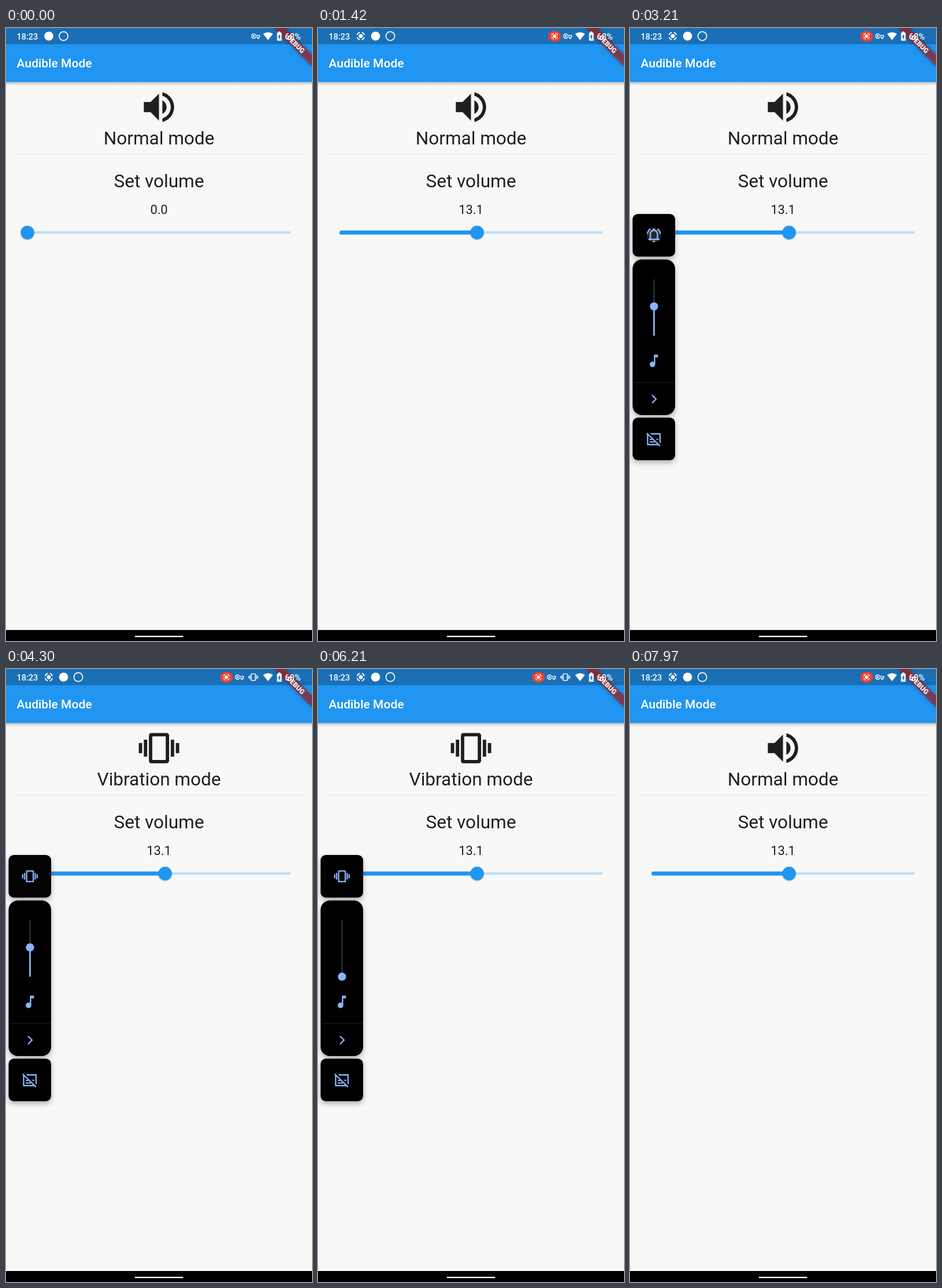
An HTML page with a canvas that plays this animation: 529x1058 px, repeating every 8 s.

```html
<!DOCTYPE html>
<html lang="en">
<head>
<meta charset="utf-8">
<title>Audible Mode</title>
<style>
html, body { margin: 0; width: 100%; height: 100%; overflow: hidden; background: #f8f8f7; }
canvas { display: block; width: 529px; height: 1058px; }
</style>
</head>
<body>
<canvas id="stage"></canvas>
<script>
const W = 529, H = 1058, LOOP = 8000;
const BLUE = '#2095f1', BG = '#f8f8f7', INK = '#1f1f1d', LIGHT = '#8ab4f8';
const FONT = 'Roboto, sans-serif';

const canvas = document.getElementById('stage');
const dpr = window.devicePixelRatio || 1;
canvas.width = W * dpr;
canvas.height = H * dpr;
const c = canvas.getContext('2d');

// Icon outlines on a 24 unit grid
const icons = {
  volume: 'M3 9v6h4l5 5V4L7 9H3zm13.5 3c0-1.77-1.02-3.29-2.5-4.03v8.05c1.48-.73 2.5-2.25 2.5-4.02zM14 3.23v2.06c2.89.86 5 3.54 5 6.71s-2.11 5.85-5 6.71v2.06c4.01-.91 7-4.49 7-8.77s-2.99-7.86-7-8.77z',
  vibrate: 'M0 15h2V9H0v6zm3 2h2V7H3v10zm19-8v6h2V9h-2zm-3 8h2V7h-2v10zM16.5 3h-9C6.67 3 6 3.67 6 4.5v15c0 .83.67 1.5 1.5 1.5h9c.83 0 1.5-.67 1.5-1.5v-15c0-.83-.67-1.5-1.5-1.5zM16 19H8V5h8v14z',
  bell: 'M12 22c1.1 0 2-.9 2-2h-4c0 1.1.9 2 2 2zm6-6v-5c0-3.07-1.63-5.64-4.5-6.32V4c0-.83-.67-1.5-1.5-1.5s-1.5.67-1.5 1.5v.68C7.64 5.36 6 7.92 6 11v5l-2 2v1h16v-1l-2-2zm-2 1H8v-6c0-2.48 1.51-4.5 4-4.5s4 2.02 4 4.5v6zM7.58 4.08L6.15 2.65C3.75 4.48 2.17 7.3 2.03 10.5h2c.15-2.65 1.51-4.97 3.55-6.42zm12.39 6.42h2c-.15-3.2-1.73-6.02-4.12-7.85l-1.42 1.43c2.02 1.45 3.39 3.77 3.54 6.42z',
  note: 'M12 3v10.55c-.59-.34-1.27-.55-2-.55-2.21 0-4 1.79-4 4s1.79 4 4 4 4-1.79 4-4V7h4V3h-6z',
  key: 'M22 19h-6v-4h-2.68c-1.14 2.42-3.6 4-6.32 4-3.86 0-7-3.14-7-7s3.14-7 7-7c2.72 0 5.17 1.58 6.32 4H24v6h-2v4zm-4-2h2v-4h2v-2H11.94l-.23-.67C11.01 8.34 9.11 7 7 7c-2.76 0-5 2.24-5 5s2.24 5 5 5c2.11 0 4.01-1.34 4.71-3.33l.23-.67H18v4zM7 15c-1.65 0-3-1.35-3-3s1.35-3 3-3 3 1.35 3 3-1.35 3-3 3zm0-4c-.55 0-1 .45-1 1s.45 1 1 1 1-.45 1-1-.45-1-1-1z',
  wifi: 'M12 21.5L23.64 7c-.45-.34-4.93-4-11.64-4S.81 6.66.36 7z',
  battery: 'M15.67 4H14V2h-4v2H8.33C7.6 4 7 4.6 7 5.33v15.33C7 21.4 7.6 22 8.33 22h7.33c.74 0 1.34-.6 1.34-1.33V5.33C17 4.6 16.4 4 15.67 4zM11 20v-5.5H9L13 7v5.5h2L11 20z'
};
for (const k in icons) icons[k] = new Path2D(icons[k]);

const span = (t, a, b) => Math.min(1, Math.max(0, (t - a) / (b - a)));
const smooth = u => u * u * (3 - 2 * u);
const easeOut = u => 1 - (1 - u) ** 3;
const mix = (a, b, u) => a + (b - a) * u;

function icon(name, x, y, size, color) {
  c.save();
  c.translate(x - size / 2, y - size / 2);
  c.scale(size / 24, size / 24);
  c.fillStyle = color;
  c.fill(icons[name], 'evenodd');
  c.restore();
}

function text(str, x, y, size, color = INK, weight = 400, align = 'center') {
  c.font = `${weight} ${size}px ${FONT}`;
  c.textAlign = align;
  c.fillStyle = color;
  c.fillText(str, x, y);
}

function rect(x, y, w, h, color) {
  c.fillStyle = color;
  c.fillRect(x, y, w, h);
}

function round(x, y, w, h, r, color) {
  c.beginPath();
  c.roundRect(x, y, w, h, r);
  c.fillStyle = color;
  c.fill();
}

function disc(x, y, r, color) {
  c.beginPath();
  c.arc(x, y, r, 0, 2 * Math.PI);
  c.fillStyle = color;
  c.fill();
}

function line(points, color, width) {
  c.beginPath();
  points.forEach(([x, y]) => c.lineTo(x, y));
  c.strokeStyle = color;
  c.lineWidth = width;
  c.stroke();
}

function shadow(blur, dy, alpha) {
  c.shadowColor = `rgba(0,0,0,${alpha})`;
  c.shadowBlur = blur * dpr;
  c.shadowOffsetY = dy * dpr;
}

function recordMark(x, y, s) {
  disc(x, y, 3.6 * s, '#fff');
  c.strokeStyle = '#fff';
  c.lineWidth = 1.6 * s;
  for (let i = 0; i < 4; i++) {
    const mid = (i + 0.5) * Math.PI / 2;
    c.beginPath();
    c.arc(x, y, 6.6 * s, mid - 0.52, mid + 0.52);
    c.stroke();
  }
}

// Ringer changes: start, end, vibrate level reached
const changes = [[3970, 4270, 1], [4910, 5210, 0], [5880, 6180, 1], [6820, 6880, 0]];

function vibrateLevel(t) {
  let level = 0;
  for (const [a, b, to] of changes) level = mix(level, to, smooth(span(t, a, b)));
  return level;
}

function isVibrating(t) {
  let on = 0;
  for (const [a, , to] of changes) if (t >= a + 30) on = to;
  return on === 1;
}

function ribbon() {
  c.save();
  c.translate(W, 0);
  c.rotate(Math.PI / 4);
  c.save();
  shadow(7, 0, 0.5);
  rect(-46.6, 32.6, 93.2, 14, 'rgba(183,28,28,.63)');
  c.restore();
  text('DEBUG', 0, 43.8, 11.9, '#fff', 900);
  c.restore();
}

function statusBar(t) {
  text('18:23', 18.5, 20, 14.5, '#fff', 500, 'left');

  const shift = 25.5 * smooth(span(t, 60, 300));
  disc(74 + shift, 14, 7.8, '#fff');
  c.beginPath();
  c.arc(99.5 + shift, 14, 7.6, 0, 2 * Math.PI);
  c.strokeStyle = '#fff';
  c.lineWidth = 1.6;
  c.stroke();

  c.globalAlpha = span(t, 150, 330);
  recordMark(74, 14, 1);

  const vib = vibrateLevel(t), back = 28 * vib;
  const chip = smooth(span(t, 150, 500));
  c.globalAlpha = chip;
  const w = 22 * mix(0.4, 1, chip);
  round(409 - back - w / 2, 5, w, 18.5, 9, '#e8412f');
  recordMark(409 - back, 14.2, 0.82);
  c.globalAlpha = 1;

  icon('key', 431.5 - back, 14, 15.5, '#fff');
  if (vib > 0) {
    c.globalAlpha = vib;
    icon('vibrate', 427.5, 14, 17, '#fff');
    c.globalAlpha = 1;
  }
  icon('wifi', 453, 14, 17.5, '#fff');
  icon('battery', 472.5, 14, 19, '#fff');
  text('68%', 482, 20, 14.8, '#fff', 500, 'left');
}

function appBar() {
  const g = c.createLinearGradient(0, 93, 0, 100);
  g.addColorStop(0, 'rgba(0,0,0,.3)');
  g.addColorStop(0.4, 'rgba(0,0,0,.12)');
  g.addColorStop(1, 'rgba(0,0,0,0)');
  rect(0, 93, W, 7, g);
  rect(0, 0, W, 93, BLUE);
  rect(0, 0, W, 28, '#1a6fb5');
  text('Audible Mode', 18.6, 68.4, 21, '#fff', 500, 'left');
}

function slider(t) {
  const y = 353;
  const x = mix(37, 275, smooth(span(t, 750, 1275)));
  const press = smooth(span(t, 730, 830)) * (1 - smooth(span(t, 1280, 1390)));

  text(((x - 37) / 455 * 25).toFixed(1), W / 2, 321.3, 21.8);
  round(x, y - 2.3, 492 - x, 4.6, 2.3, '#c0dff8');
  if (x > 37) round(37, y - 3.5, x - 37, 7, 3.5, BLUE);
  if (press > 0) disc(x, y, 28 * press, 'rgba(33,150,243,.14)');
  c.save();
  shadow(mix(2, 9, press), mix(1, 4, press), mix(0.3, 0.4, press));
  disc(x, y, 11.7, BLUE);
  c.restore();
}

function page(t) {
  const vib = isVibrating(t);
  icon(vib ? 'vibrate' : 'volume', 264.5, 136.6, 69.9, INK);
  text(vib ? 'Vibration mode' : 'Normal mode', 264.5, 200.5, 31.5);
  rect(10, 217, 511, 1, '#e7e7e6');
  text('Set volume', 264.5, 274.6, 31.5);
  slider(t);
}

function captionsOff() {
  c.lineJoin = 'round';
  c.strokeStyle = LIGHT;
  c.lineWidth = 2.3;
  c.strokeRect(30.5, 700.5, 21.5, 18.5);
  line([[34, 710], [39, 710]], LIGHT, 2.2);
  line([[43, 710], [49, 710]], LIGHT, 2.2);
  line([[34, 714.5], [43, 714.5]], LIGHT, 2.2);
  line([[31, 698], [54, 720]], '#000', 3);
  line([[28.8, 699], [52, 721.5]], LIGHT, 2.3);
}

function ripple(t, start) {
  const u = span(t, start, start + 370);
  if (u <= 0 || u >= 1) return;
  c.save();
  c.beginPath();
  c.roundRect(4.5, 321, 73.5, 73.5, 9);
  c.clip();
  disc(41.3, 357.8, mix(12, 44, easeOut(u)), `rgba(255,255,255,${0.16 * (1 - u)})`);
  c.restore();
}

function volumePanel(t) {
  const enter = easeOut(span(t, 1430, 1670));
  const leave = span(t, 7780, 7960) ** 2;
  const shown = enter * (1 - leave);
  if (shown <= 0) return;

  c.save();
  c.globalAlpha = shown;
  c.translate(-37 * (1 - enter) - 37 * leave, 0);
  for (const [y, h, r] of [[321, 73.5, 9], [399.5, 268.5, 16], [672.5, 73.5, 9]]) {
    c.save();
    shadow(10, 4, 0.3);
    round(4.5, y, 73.5, h, r, '#000');
    c.restore();
  }
  ripple(t, 3210);
  ripple(t, 3960);

  if (isVibrating(t)) icon('vibrate', 41.4, 357.8, 27.5, LIGHT);
  else icon('bell', 41.3, 357.3, 29.5, LIGHT);

  const low = smooth(span(t, 5890, 5990)) * (1 - smooth(span(t, 6810, 6880)));
  const y = mix(480.5, 531, low);
  line([[41.5, 434], [41.5, 531]], '#29313c', 2.4);
  line([[41.5, y], [41.5, 531]], LIGHT, 2.8);
  disc(41.5, y, 7.1, LIGHT);

  icon('note', 41.3, 574.5, 28.5, LIGHT);
  rect(4.5, 611.5, 73.5, 1, '#222');
  line([[38, 633.5], [45, 640.5], [38, 647.5]], LIGHT, 2.2);
  captionsOff();
  c.restore();
}

function draw(t) {
  c.setTransform(dpr, 0, 0, dpr, 0, 0);
  rect(0, 0, W, H, BG);
  page(t);
  appBar();
  ribbon();
  volumePanel(t);
  statusBar(t);
  rect(0, 1039, W, 19, '#000');
  round(222.5, 1049, 84, 2.2, 1.1, '#fff');
}

const start = performance.now();
function tick() {
  draw((performance.now() - start) % LOOP);
  requestAnimationFrame(tick);
}
tick();
</script>
</body>
</html>
```
